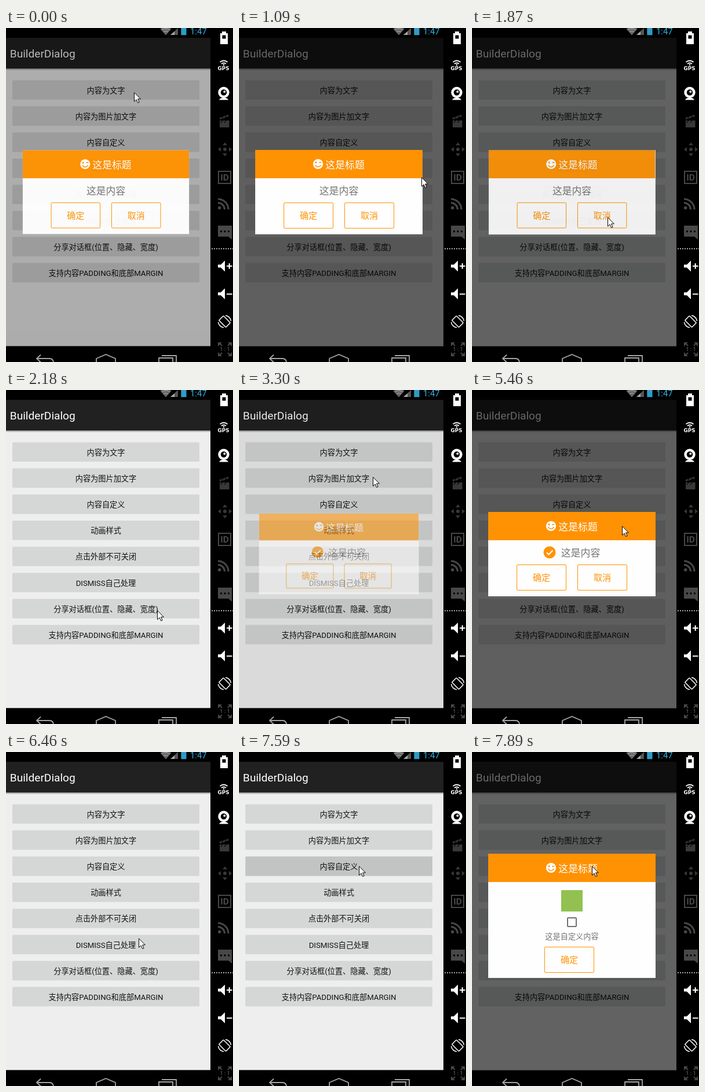
An HTML page that plays this animation: 392 px wide and 578 px high, repeating every 8000 ms.

```html
<!DOCTYPE html>
<html lang="zh-CN">
<head>
<meta charset="utf-8">
<title>BuilderDialog</title>
<style>
html, body { margin: 0; width: 100%; height: 100%; overflow: hidden; background: #000; }
svg { display: block; width: 100vw; height: 100vh; font-family: Roboto, "Noto Sans CJK SC", "Noto Sans CJK", sans-serif; }
.mid { text-anchor: middle; }
.list { font-size: 13.2px; fill: #111; }
.title { font-size: 16.9px; fill: #fff; }
.body { font-size: 16.9px; fill: #757575; }
.note { font-size: 13.2px; fill: #757575; }
.label { font-size: 15.1px; fill: #ff9202; }
.line { fill: none; stroke-linecap: butt; }
.anim { animation: 8s step-end infinite; }
.dialog { transform-origin: 172px 268px; }
#dim { animation-name: dim; }
#press { animation-name: press; }
#plain { animation-name: plain; }
#icon { animation-name: icon; }
#custom { animation-name: custom; }
#cursor { animation-name: cursor; }

@keyframes dim {
  0% { opacity: .275 }
  1.5% { opacity: .6 }
  23.375% { opacity: .59 }
  25.25% { opacity: .3 }
  27.25% { opacity: 0 }
  39.625% { opacity: .02 }
  41.25% { opacity: .085 }
  43% { opacity: .275 }
  44.625% { opacity: .6 }
  77.25% { opacity: .5 }
  78.875% { opacity: .22 }
  80.75% { opacity: 0 }
  96.875% { opacity: .2 }
  98.625%, 100% { opacity: .59 }
}
@keyframes plain {
  0% { opacity: .97; transform: scale(.994) }
  1.5% { opacity: 1; transform: none }
  23.375% { opacity: .92; transform: scale(.994) }
  25.25% { opacity: .3; transform: scale(.94) }
  27.25%, 100% { opacity: 0; transform: none }
}
@keyframes icon {
  0% { opacity: 0; transform: none }
  39.625% { opacity: .18; transform: scale(.915) }
  41.25% { opacity: .57; transform: scale(.955) }
  43% { opacity: .97; transform: scale(.994) }
  44.625% { opacity: 1; transform: none }
  77.25% { opacity: .75; transform: scale(.98) }
  78.875% { opacity: .15; transform: scale(.92) }
  80.75%, 100% { opacity: 0; transform: none }
}
@keyframes custom {
  0% { opacity: 0; transform: none }
  96.875% { opacity: .85; transform: scale(.98) }
  98.625%, 100% { opacity: 1; transform: none }
}
@keyframes press {
  0% { opacity: 0 }
  94.875% { opacity: 1 }
  98.625%, 100% { opacity: 0 }
}
@keyframes cursor {
  0% { transform: translate(221px, 111px) }
  8.75% { transform: translate(225px, 116px) }
  10.25% { transform: translate(246px, 139px) }
  11.75% { transform: translate(263px, 156px) }
  13.625% { transform: translate(315px, 258px) }
  15.25% { transform: translate(280px, 312px) }
  16.75% { transform: translate(249px, 337px) }
  18.5% { transform: translate(243px, 333px) }
  20% { transform: translate(237px, 329px) }
  21.5% { transform: translate(234px, 327px) }
  25.25% { transform: translate(240px, 342px) }
  27.25% { transform: translate(261px, 381px) }
  29% { transform: translate(249px, 300px) }
  30.5% { transform: translate(233px, 226px) }
  32.375% { transform: translate(231px, 170px) }
  34% { transform: translate(231px, 151px) }
  35.875% { transform: translate(231px, 150px) }
  68.25% { transform: translate(259px, 235px) }
  70.125% { transform: translate(261px, 315px) }
  72% { transform: translate(249px, 326px) }
  73.5% { transform: translate(241px, 331px) }
  78.875% { transform: translate(236px, 328px) }
  80.75% { transform: translate(229px, 322px) }
  82.625% { transform: translate(206px, 262px) }
  84.125% { transform: translate(189px, 214px) }
  85.625% { transform: translate(204px, 195px) }
  87.5% { transform: translate(207px, 193px) }
  91.375% { transform: translate(207px, 195px) }
  93%, 100% { transform: translate(207px, 197px) }
}
</style>
</head>
<body>
<svg viewBox="0 0 392 578" preserveAspectRatio="none">
  <defs>
    <linearGradient id="shade" x2="0" y2="1">
      <stop offset="0" stop-color="#000" stop-opacity=".4"/>
      <stop offset="1" stop-color="#000" stop-opacity="0"/>
    </linearGradient>
    <rect id="row" x="11" width="323" height="33.6" rx="1.5"/>
    <rect id="btn" x=".5" y=".5" width="85" height="44" rx="1.5" fill="none" stroke="#ff9202"/>
    <g id="head">
      <rect width="289" height="49" fill="#ff9202"/>
      <circle cx="108.5" cy="24.3" r="8.6" fill="#fff"/>
      <path class="line" d="M103.5 26.3q5 6.4 10 0M110.3 22.4q1.8-2 3.8 0" stroke="#ff9202" stroke-width="1.5"/>
      <ellipse cx="105" cy="21.8" rx="1.4" ry="1.8" fill="#ff9202"/>
      <text class="title" x="121.3" y="31.6">这是标题</text>
    </g>
    <g id="pair">
      <rect x="28" y="211" width="289" height="146" fill="#fefefe"/>
      <use href="#head" x="28" y="211"/>
      <use href="#btn" x="77" y="302"/>
      <use href="#btn" x="182" y="302"/>
      <text class="label mid" x="120" y="330.3">确定</text>
      <text class="label mid" x="225" y="330.3">取消</text>
    </g>
    <path id="speaker" d="M366 7h5l7-7v19l-7-7h-5z" fill="#fff"/>
  </defs>

  <rect width="392" height="578"/>

  <!-- app screen -->
  <rect y="17" width="353" height="533.4" fill="#eee"/>
  <rect y="70" width="353" height="3.5" fill="url(#shade)"/>
  <rect y="17" width="353" height="53" fill="#212121"/>
  <text x="6.8" y="51" font-size="19.1" fill="#fff">BuilderDialog</text>
  <g fill="#d5d7d6">
    <use href="#row" y="90.4"/><use href="#row" y="135.6"/>
    <use href="#row" y="180.8"/><use href="#row" y="226"/>
    <use href="#row" y="271.2"/><use href="#row" y="316.4"/>
    <use href="#row" y="361.6"/><use href="#row" y="406.6"/>
  </g>
  <use id="press" class="anim" href="#row" y="180.8" fill="#c2c4c3"/>
  <g class="list mid">
    <text x="172.5" y="112.6">内容为文字</text>
    <text x="172.5" y="157.8">内容为图片加文字</text>
    <text x="172.5" y="203">内容自定义</text>
    <text x="172.5" y="248.2">动画样式</text>
    <text x="172.5" y="293.4">点击外部不可关闭</text>
    <text x="172.5" y="338.6">DISMISS自己处理</text>
    <text x="172.5" y="383.8">分享对话框(位置、隐藏、宽度)</text>
    <text x="172.5" y="428.8">支持内容PADDING和底部MARGIN</text>
  </g>
  <rect id="dim" class="anim" y="17" width="353" height="533.4"/>

  <!-- status bar -->
  <path d="M266.5 1.5Q276-5 285.5 1.5L276 12.5z" fill="#666"/>
  <path class="line" d="M269 3.5q7-5 14 0M272 7q4-3 8 0" stroke="#999" stroke-width="1.3"/>
  <path d="M297 0v12h-13z" fill="#555"/>
  <path d="M291 6v6h-7z" fill="#aaa"/>
  <rect x="302.3" width="9.2" height="12.3" fill="#2f9cc6"/>
  <text x="318" y="11" font-size="14.8" fill="#33b5e5">1:47</text>

  <!-- navigation bar -->
  <g class="line" stroke="#a6a6a6" stroke-width="1.8">
    <path d="M60 565.5l-7 6.500 7 6.500M53 572h22q7 0 7 8"/>
    <path d="M156 580v-8l16.5-7 16.5 7v8"/>
    <path d="M264 580v-9h24v9M269 567h25v13"/>
  </g>

  <!-- dialogs -->
  <g id="plain" class="anim dialog">
    <use href="#pair"/>
    <text class="body mid" x="172.5" y="288">这是内容</text>
  </g>
  <g id="icon" class="anim dialog">
    <use href="#pair"/>
    <circle cx="134" cy="281" r="10.5" fill="#ff9202"/>
    <path class="line" d="M129 281.3l3.5 3.5 7-7.3" stroke="#fff" stroke-width="2"/>
    <text class="body mid" x="187.5" y="288">这是内容</text>
  </g>
  <g id="custom" class="anim dialog">
    <rect x="28" y="176" width="289" height="215" fill="#fefefe"/>
    <use href="#head" x="28" y="176"/>
    <rect x="154" y="239" width="37" height="37" fill="#92c152"/>
    <rect class="line" x="165" y="287" width="15" height="15" rx="1" stroke="#717171" stroke-width="2"/>
    <text class="note mid" x="172.5" y="324">这是自定义内容</text>
    <use href="#btn" x="125" y="337"/>
    <text class="label mid" x="168" y="365.2">确定</text>
  </g>

  <!-- tool strip -->
  <rect x="353" width="39" height="578"/>
  <path d="M373 6h7v3h3v19h-13V9h3z" fill="#fff"/>
  <rect x="373.5" y="12.5" width="6" height="6"/>

  <path class="line" d="M369.5 59q6.500-5 13 0M372 62q4-3 8 0" stroke="#fff" stroke-width="1.8"/>
  <circle cx="376" cy="63.8" r="1.3" fill="#fff"/>
  <text class="mid" x="375.6" y="73" font-size="8.8" font-weight="700" font-family="DejaVu Sans, sans-serif" fill="#fff">GPS</text>

  <g fill="#fff">
    <circle cx="376" cy="111.5" r="9.7"/>
    <path d="M368 124.5q2-4 8-4t8 4z"/>
  </g>
  <circle cx="376" cy="111.5" r="5.2"/>
  <circle cx="377.3" cy="110.2" r="1.9" fill="#fff"/>

  <g fill="#383838">
    <path d="M369 160h16.5v12H369zM368.5 155.5l15-5.5 1.2 3-15 5.5z"/>
    <circle cx="378" cy="210" r="3"/>
    <path d="M378 198l4 5h-8zM378 222l4-5h-8zM366 210l5-4v8zM390 210l-5-4v8z"/>
  </g>
  <path class="line" d="M372 157.5l3-4M378 155.5l3-4M371 164l3-4M377 164l3-4" stroke="#000" stroke-width="1.2"/>

  <rect class="line" x="367" y="248" width="21" height="21" stroke="#484848" stroke-width="2"/>
  <text class="mid" x="377.5" y="264" font-size="15.5" font-weight="700" fill="#484848">ID</text>

  <circle cx="368.7" cy="311.3" r="2.7" fill="#484848"/>
  <path class="line" d="M366 302.5a11.5 11.5 0 0 1 11.5 11.5M366 296a18 18 0 0 1 18 18" stroke="#484848" stroke-width="3"/>

  <path d="M366 342h24v24l-6-5h-18z" fill="#484848"/>
  <circle cx="371.5" cy="352" r="1.7"/><circle cx="378" cy="352" r="1.7"/><circle cx="384.5" cy="352" r="1.7"/>

  <path class="line" d="M355 382h37" stroke="#aaa" stroke-width="2" stroke-dasharray="2 2"/>
  <use href="#speaker" y="402.5"/>
  <use href="#speaker" y="450.5"/>
  <path class="line" d="M381 412h9.5M385.7 407.3v9.5M381 460.5h9.5" stroke="#fff" stroke-width="2.2"/>

  <g class="line" stroke="#fff" stroke-width="1.5">
    <rect x="372" y="499.5" width="11" height="17" rx="1" transform="rotate(-45 377.5 508)"/>
    <path d="M379 497.5a11 11 0 0 1 9.5 9.5M376 518.5a11 11 0 0 1-9.5-9.5"/>
  </g>

  <g fill="#484848">
    <path d="M366 544h7l-2.3 2.3 3 3-1.4 1.4-3-3L366 551zM390 544h-7l2.3 2.3-3 3 1.4 1.4 3-3L390 551zM366 568h7l-2.3-2.3 3-3-1.4-1.4-3 3L366 561zM390 568h-7l2.3-2.3-3-3 1.4-1.4 3 3L390 561z"/>
    <text class="mid" x="378" y="559.3" font-size="9" font-weight="700">1 : 1</text>
  </g>

  <g id="cursor" class="anim">
    <path d="M.5.8v15.4l3.6-3.3 2.5 5.6 2.5-1.1-2.500-5.500h4.800z" fill="#fff" stroke="#000"/>
  </g>
</svg>
</body>
</html>
```
